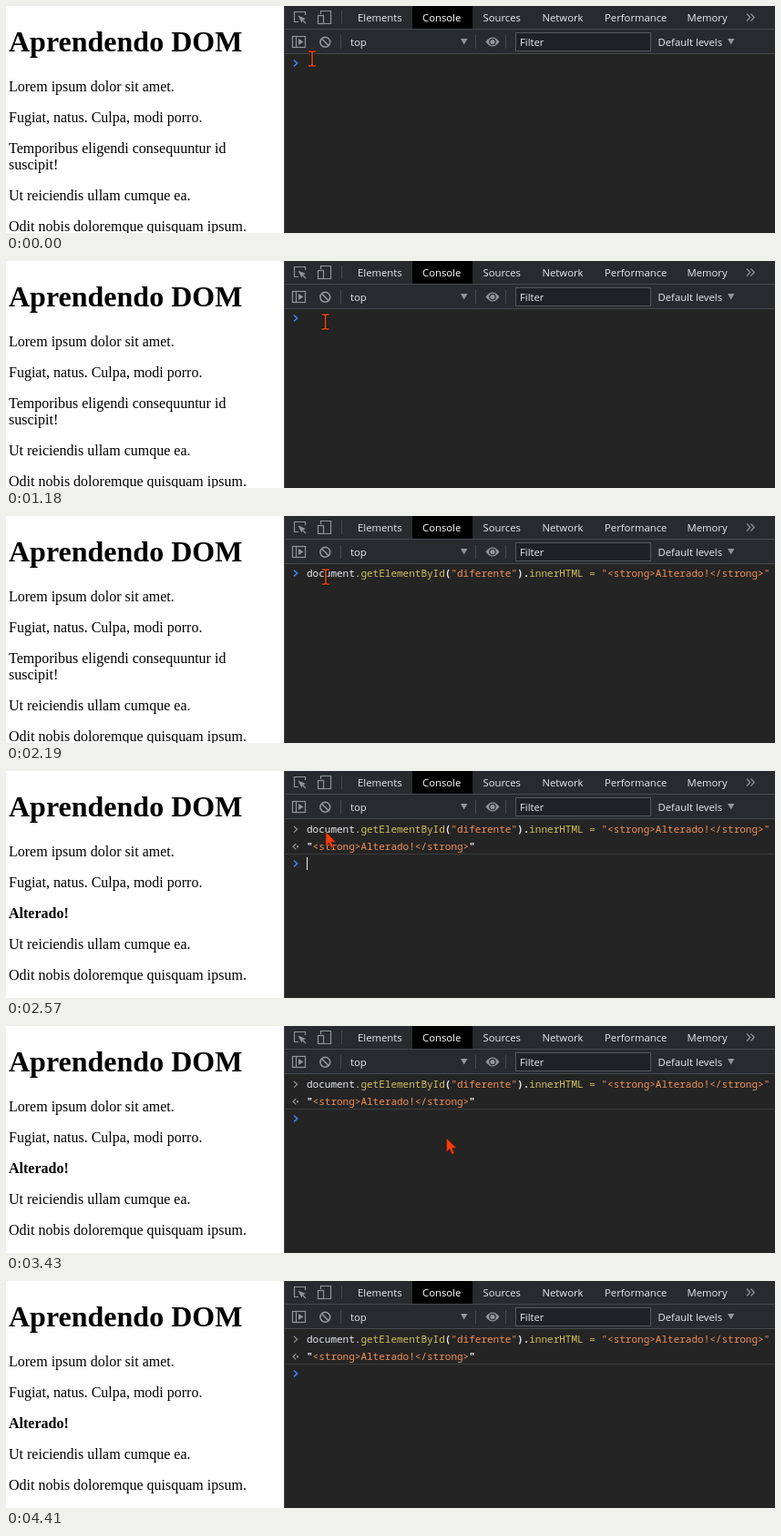
An HTML page that plays this animation: 844 px wide and 250 px high, repeating every 4.45 s.

```html
<!DOCTYPE html>
<html lang="pt">
<head>
<meta charset="utf-8">
<title>Aprendendo DOM</title>
<style>
html, body { margin: 0; width: 100%; height: 100%; overflow: hidden; background: #fff; }
svg { display: block; }
.page { font: 16px "Liberation Serif", "Times New Roman", serif; fill: #000; }
.page .title { font-size: 32px; }
.bold { font-weight: bold; }
.ui { font: 500 11.3px "Open Sans", "Noto Sans", sans-serif; fill: #e8eaed; }
.code { font: 500 11px "Noto Sans Mono", "Liberation Mono", monospace; fill: #e8eaed; white-space: pre; }
.code .prop { fill: #d2c05c; }
.code .str { fill: #f29055; }
.code .bold { font-weight: bold; }
.icon { fill: none; stroke: #919599; stroke-width: 1.2; }
.rule { stroke: #46494d; shape-rendering: crispEdges; }
</style>
</head>
<body>
<svg width="844" height="250" viewBox="0 0 844 250">
  <rect width="844" height="250" fill="#fff"/>
  <g class="page">
    <text class="title bold" x="3" y="50">Aprendendo DOM</text>
    <text x="3" y="94">Lorem ipsum dolor sit amet.</text>
    <text x="3" y="128">Fugiat, natus. Culpa, modi porro.</text>
    <g id="before">
      <text x="3" y="162">Temporibus eligendi consequuntur id</text>
      <text x="3" y="180">suscipit!</text>
    </g>
    <text id="after" class="bold" x="3" y="162">Alterado!</text>
    <g id="tail">
      <text x="3" y="214">Ut reiciendis ullam cumque ea.</text>
      <text x="3" y="248">Odit nobis doloremque quisquam ipsum.</text>
    </g>
  </g>

  <rect x="305" width="539" height="250" fill="#242424"/>
  <rect x="305" width="539" height="52" fill="#292a2d"/>
  <rect x="446" width="66" height="25" fill="#000"/>
  <path class="rule" d="M305 25.5H844M305 52.5H844M368.5 5V20M367.5 32V47M515.5 32V47M548.5 32V47"/>
  <path d="M305.5 0V250" stroke="#46494d"/>

  <g class="icon">
    <path d="M321 17.5H316.5V6.5H328.5V10"/>
    <path d="M320.5 10.5L329 14L325.8 15.3L324.5 18.5Z" fill="#919599" stroke="none"/>
    <path d="M325 15L329 19"/>
    <path d="M345.5 9V5.5H356.5V19.5H349"/>
    <rect x="342.5" y="10.5" width="6" height="9"/>
    <path d="M813 8.5L816.7 12.5L813 16.5M817.5 8.5L821.2 12.5L817.5 16.5"/>
    <rect x="314.5" y="33.5" width="14" height="12"/>
    <path d="M318.5 33.5V45.5"/>
    <path d="M321 36L326.5 39.5L321 43Z" fill="#919599" stroke="none"/>
    <circle cx="350.3" cy="39.8" r="5.4" stroke-width="1.6"/>
    <path d="M346.5 36L354 43.6" stroke-width="1.6"/>
    <path d="M526.5 39.5Q534 29.5 541.5 39.5Q534 49.5 526.5 39.5Z" fill="#919599" stroke="none"/>
    <circle cx="534" cy="39.5" r="3.2" stroke="#292a2d"/>
    <path d="M499 36H506.5L502.7 42.5ZM792 36H799.5L795.7 42.5Z" fill="#919599" stroke="none"/>
  </g>
  <rect x="559.5" y="29.5" width="148" height="20" fill="#202124" stroke="#55585c"/>

  <g class="ui">
    <text x="386" y="17">Elements</text>
    <text x="457" y="17" fill="#fff">Console</text>
    <text x="523.5" y="17">Sources</text>
    <text x="588.5" y="17">Network</text>
    <text x="657" y="17">Performance</text>
    <text x="747.5" y="17">Memory</text>
    <text x="378" y="44">top</text>
    <text x="564" y="44">Filter</text>
    <text x="715.5" y="44">Default levels</text>
  </g>

  <g id="command">
    <text class="code" x="330" y="67">document.<tspan class="prop">getElementById</tspan><tspan class="bold">(</tspan><tspan class="str">"diferente"</tspan><tspan class="bold">).</tspan><tspan class="prop">innerHTML =</tspan> <tspan class="str">"&lt;strong&gt;Alterado!&lt;/strong&gt;"</tspan></text>
  </g>
  <g id="result">
    <path class="icon" d="M316 61L319.7 64.3L316 67.6M318.3 80.2L315 83.3L318.3 86.4"/>
    <rect x="319" y="82.3" width="2" height="2" fill="#919599"/>
    <text class="code" x="330" y="87"><tspan class="bold">"</tspan><tspan class="str">&lt;strong&gt;Alterado!&lt;/strong&gt;</tspan><tspan class="bold">"</tspan></text>
    <path d="M305 91.5H844" stroke="#3a3b3d"/>
  </g>
  <path id="prompt" d="M316 59.7L319.7 63L316 66.3" fill="none" stroke="#3b82e6" stroke-width="1.6"/>
  <rect id="caret" width="1" height="14" fill="#f1f1f1"/>

  <g id="mouse">
    <circle id="press" r="12" cy="-1" fill="#dccd00" opacity=".68"/>
    <g id="beam" fill="none">
      <path d="M-4 -8H-1L0 -7L1 -8H4M0 -7V7M-4 8H-1L0 7L1 8H4" stroke="#191411" stroke-width="3.4"/>
      <path d="M-4 -8H-1L0 -7L1 -8H4M0 -7V7M-4 8H-1L0 7L1 8H4" stroke="#e04a16" stroke-width="1.6"/>
    </g>
    <path id="arrow" d="M0 0V15.5L3.6 12.2L6.2 18L8.8 16.8L6.2 11.2H11Z" fill="#fa3c06" stroke="#54200f" stroke-width=".8"/>
  </g>
</svg>
<script>
const LOOP = 4450, CLICK = 640, RELEASE = 870, PASTE = 1340, ENTER = 2570, GONE = 3990;
const el = id => document.getElementById(id);
const show = (id, on) => el(id).setAttribute("visibility", on ? "visible" : "hidden");
const move = (id, x, y) => el(id).setAttribute("transform", `translate(${x} ${y})`);

// time, x, y
const path = [
  [0, 336, 58], [480, 350.5, 67], [3130, 351, 67],
  [3910, 750, 237], [GONE, 768, 258]
];
const smooth = p => p * p * (3 - 2 * p);

function mouseAt(t) {
  const i = path.findIndex(k => t < k[0]);
  if (i < 1) return path[path.length - 1].slice(1);
  const [t0, x0, y0] = path[i - 1], [t1, x1, y1] = path[i];
  const p = smooth((t - t0) / (t1 - t0));
  return [x0 + (x1 - x0) * p, y0 + (y1 - y0) * p];
}

function draw(t) {
  const pasted = t >= PASTE, done = t >= ENTER;
  show("before", !done);
  show("after", done);
  move("tail", 0, done ? -18 : 0);
  show("command", pasted);
  move("command", 0, done ? 1 : 0);
  show("result", done);
  move("prompt", 0, done ? 39 : 0);

  // The caret restarts its blink at every input.
  const input = done ? ENTER : pasted ? PASTE : CLICK;
  show("caret", t >= CLICK && (t - input) % 1000 < 500);
  move("caret", pasted && !done ? 838 : 330, done ? 95 : 56);

  move("mouse", ...mouseAt(t));
  show("press", t >= CLICK && t < RELEASE);
  show("beam", !done);
  show("arrow", done && t < GONE);
}

const start = performance.now();
function tick() {
  draw((performance.now() - start) % LOOP);
  requestAnimationFrame(tick);
}
tick();
</script>
</body>
</html>
```
